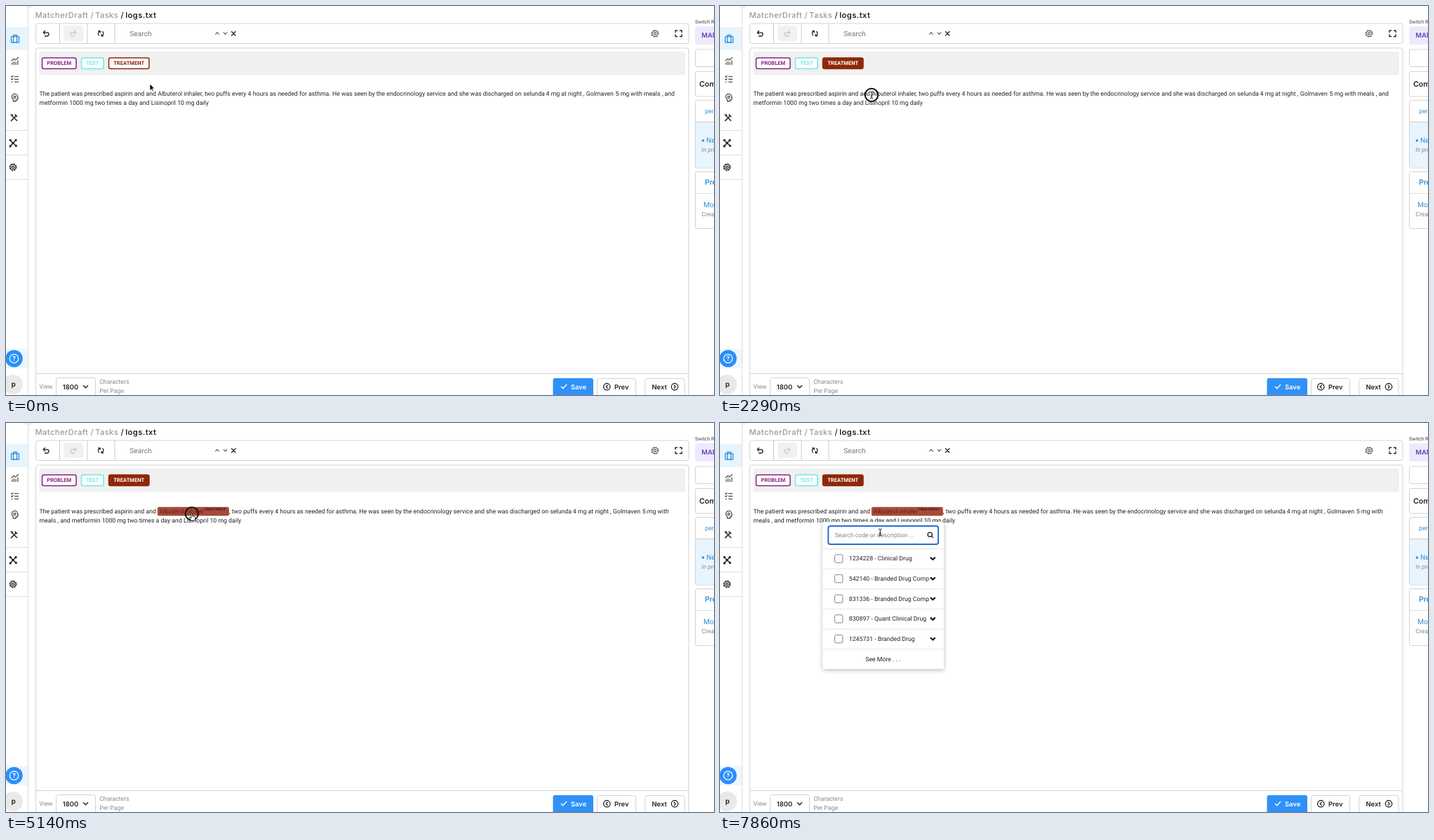
An HTML page that plays this animation: 1009 by 555 pixels, repeating every 8000 ms.

```html
<!DOCTYPE html>
<html lang="en">
<head>
<meta charset="utf-8">
<title>Annotation editor</title>
<style>
html, body { margin: 0; width: 100%; height: 100%; overflow: hidden; background: #fff; }
svg { display: block; width: 1009px; height: 555px; text-rendering: geometricPrecision; }
text { font: 8.72px Roboto, sans-serif; fill: #222; }
.head, .head text { font: 500 11.2px Inter, sans-serif; letter-spacing: .4px; fill: #9a9a9a; }
.btn { font: 600 9.4px Inter, sans-serif; }
.tag { font: 700 7.6px Roboto, sans-serif; text-anchor: middle; }
.box { fill: #fff; stroke: #d3d3d3; }
.rule { stroke: #dedede; fill: none; }
.ico { fill: none; stroke: #333; stroke-width: 1.3; stroke-linecap: round; stroke-linejoin: round; }
.grey { fill: #888; }
.blue { fill: #2d8fd8; }
</style>
</head>
<body>
<svg viewBox="0 0 1009 555">
  <defs>
    <path id="down" d="M-2.3 -1.1 0 1.2 2.3 -1.1"/>
    <path id="undo" d="M-1.5 -4 -3.8 -1.7 -1.5 .6M-3.8 -1.7H1.4A2.6 2.6 0 0 1 1.4 3.5H-1.5"/>
    <g id="gear">
      <circle r="4.1"/><circle r="1.7"/>
      <circle r="4.9" stroke-dasharray="1.9 1.95" stroke-width="1.1" stroke-linecap="butt"/>
    </g>
    <clipPath id="selClip"><rect id="selArea" x="216" y="119" width="0" height="13"/></clipPath>
    <clipPath id="rowClip"><rect x="147" y="180" width="151.5" height="170"/></clipPath>
    <filter id="shadow" x="-20%" y="-20%" width="140%" height="140%">
      <feDropShadow dx="0" dy="1.5" stdDeviation="3" flood-opacity=".28"/>
    </filter>
  </defs>

  <!-- sidebar -->
  <rect y="30" width="31" height="33" fill="#e6f4fd"/>
  <rect y="489" width="31" height="28" fill="#eef6ff"/>
  <path class="rule" d="M31.5 0V555M0 177.5H31M0 212.5H31M0 247.5H31"/>
  <circle class="rule" cx="33" cy="-3.5" r="5.5"/>
  <g class="ico" style="stroke:#2d8fd8">
    <rect x="7.5" y="43.5" width="11" height="8.5" rx="1"/>
    <path d="M10.5 43.5V52M15.5 43.5V52M10.8 43V41.3H15.2V43"/>
  </g>
  <g class="ico" style="stroke:#555">
    <path d="M8 78 11 75.3 13.4 77 17.5 73.5M8.8 83.5V81M11.4 83.5V79.5M14 83.5V80.5M16.8 83.5V78"/>
    <path d="M7.5 100.5 8.5 101.5 10 99.8M12.5 100.7H17.5M7.5 104.3 8.5 105.3 10 103.6M12.5 104.5H17.5M8 108.3H9M12.5 108.3H17.5"/>
    <path d="M10.3 136V133.2A4.2 4.2 0 1 1 16.7 129.7L17.3 131.8H16.3V134H14.2V136Z"/>
    <circle cx="12.5" cy="130" r="1.5"/>
  </g>
  <g class="ico" style="stroke:#333;stroke-width:1.7">
    <path d="M8 156 15.5 163.5M7.5 163.7 14.3 156.8M13 155.2 15.5 157.7M7.2 155.3H9.2V157.3"/>
  </g>
  <g class="ico" style="stroke:#222">
    <path d="M10 195.5 6.7 192M10 195.5 13.6 192M10 195.5 6.7 199.5M10 195.5 13.8 199"/>
    <circle cx="6.2" cy="191.4" r="1"/><circle cx="14" cy="191.5" r="1"/>
    <circle cx="6.2" cy="200" r="1"/><circle cx="14.3" cy="199.4" r="1"/>
    <circle cx="10" cy="195.5" r="1.2"/>
    <use href="#gear" x="10" y="230"/>
  </g>
  <circle cx="11.5" cy="503" r="12.3" fill="#2b8ffa"/>
  <circle class="ico" cx="11.5" cy="503" r="6.2" style="stroke:#fff"/>
  <text x="11.5" y="506.3" text-anchor="middle" style="font-size:9px;font-weight:700;fill:#fff">?</text>
  <circle cx="10" cy="540" r="14" fill="#e9e9e9"/>
  <text class="btn" x="10.7" y="542.5" text-anchor="middle" style="font-size:10px">p</text>

  <!-- breadcrumb -->
  <g class="head">
    <text x="41.5" y="17">MatcherDraft</text><text x="120.5" y="17">/</text>
    <text x="127" y="17">Tasks</text><text x="163.5" y="17" style="fill:#222">/</text>
    <text x="170.3" y="17" style="fill:#222;font-weight:600">logs.txt</text>
  </g>

  <!-- toolbar -->
  <rect class="box" x="42.5" y="25" width="930.5" height="28.5" rx="3"/>
  <path class="rule" d="M76.5 25V53M116 25V53M155 25V53" style="stroke:#ccc"/>
  <rect x="82" y="28" width="28" height="22" rx="4" fill="#f1f1f1"/>
  <g class="ico" style="stroke:#222">
    <use href="#undo" x="57" y="39.5"/>
    <use href="#undo" transform="translate(96 39.5) scale(-1 1)" stroke="#c8c8c8" style="stroke:#c8c8c8"/>
    <path d="M132.5 42A3.6 3.6 0 0 1 134 35.9M131.8 35.6H134.2V38M137.7 36.4A3.6 3.6 0 0 1 136.3 42.5M138.5 42.8H136.1V40.4"/>
    <use href="#down" transform="translate(301 39) scale(1 -1)" style="stroke:#666"/>
    <use href="#down" x="312.5" y="39" style="stroke:#666"/>
    <path d="M321.5 36.5 327 42M327 36.5 321.5 42"/>
  </g>
  <g class="ico" style="stroke:#555;stroke-width:1.1">
    <use href="#gear" x="925" y="39.3"/>
    <path d="M956.5 35H954V37.5M960.5 35H963V37.5M956.5 43.5H954V41M960.5 43.5H963V41" style="stroke:#222;stroke-width:1.4"/>
  </g>
  <text x="176.3" y="42.8" style="font-size:10.2px;fill:#777">Search</text>

  <!-- editor -->
  <rect class="box" x="42.5" y="60" width="930.5" height="510" rx="3"/>
  <rect x="47.5" y="65" width="920.5" height="33.5" rx="3" fill="#f0f0f0"/>
  <g stroke-width="1.5">
    <rect x="51.5" y="74" width="48.5" height="15.5" rx="2.5" fill="#fff" stroke="#862481"/>
    <rect x="107.5" y="74" width="31.5" height="15.5" rx="2.5" fill="#fff" stroke="#6fe9e3"/>
    <rect id="treat" x="146.5" y="74" width="57.5" height="15.5" rx="2.5" stroke="#8a2a0c"/>
  </g>
  <text class="tag" x="75.8" y="84.4" style="fill:#862481">PROBLEM</text>
  <text class="tag" x="123.3" y="84.4" style="fill:#6fe9e3">TEST</text>
  <text class="tag" id="treatText" x="175.2" y="84.4">TREATMENT</text>

  <g id="plain">
    <g id="plainText"></g>
    <g id="selection">
      <rect id="selBox" x="216" y="119" width="0" height="12.5" fill="#2f80d8"/>
      <text x="216.3" y="128" clip-path="url(#selClip)" style="fill:#fff">Albuterol inhaler,</text>
    </g>
  </g>
  <g id="marked">
    <rect x="216.3" y="120.3" width="101" height="11.6" rx="1.5" fill="#a94b3a" stroke="#96361f" stroke-width=".8"/>
    <text x="218.7" y="129.2" style="fill:#5f2117">Albuterol inhaler</text>
    <text x="282" y="125.4" style="font:5.75px 'Liberation Mono',monospace;fill:#1c0c08">TREATMENT</text>
    <g id="markedText"></g>
  </g>

  <!-- footer -->
  <path class="rule" d="M42 524.5H973" style="stroke:#d3d3d3"/>
  <text class="grey" x="47.5" y="546">View</text>
  <rect class="box" x="71.5" y="530.5" width="56" height="30" rx="3"/>
  <text class="btn" x="80.8" y="546.5">1800</text>
  <use class="ico" href="#down" transform="translate(113.5 543.2) scale(1.3)"/>
  <text class="grey" x="133.2" y="539.3">Characters</text>
  <text class="grey" x="133.2" y="552">Per Page</text>
  <rect x="779.5" y="531" width="57.5" height="30" rx="3" fill="#2f91f8"/>
  <path class="ico" d="M791.3 543.3 793.8 545.8 798.8 540.3" style="stroke:#fff"/>
  <text class="btn" x="805" y="546.5" style="fill:#fff">Save</text>
  <rect class="box" x="842.5" y="531.5" width="55" height="30" rx="3"/>
  <rect class="box" x="911" y="531.5" width="56" height="30" rx="3"/>
  <g class="ico" style="stroke:#222">
    <circle cx="856.3" cy="543.2" r="4.7"/><path d="M857.2 541.2 855.2 543.2 857.2 545.2"/>
    <circle cx="953" cy="543.2" r="4.7"/><path d="M952.2 541.2 954.2 543.2 952.2 545.2"/>
  </g>
  <text class="btn" x="867" y="546.5">Prev</text>
  <text class="btn" x="920.5" y="546.5">Next</text>

  <!-- right panel -->
  <text x="982" y="25.2" style="font-size:7.1px;fill:#444">Switch Role</text>
  <rect x="982" y="29" width="60" height="26" rx="3" fill="#efe9fd"/>
  <text class="btn" x="991.3" y="45.3" style="fill:#5a3fc4">MANUAL</text>
  <rect class="box" x="982.5" y="62" width="60" height="24.5" rx="2"/>
  <rect class="box" x="982.5" y="93.5" width="60" height="35.5" rx="2"/>
  <text class="btn" x="988" y="114.7" style="font-size:10.6px">Completions</text>
  <rect class="box" x="982.5" y="134.5" width="60" height="96.5" rx="2"/>
  <rect x="983" y="166" width="60" height="64.5" fill="#e8f5fe"/>
  <path class="rule" d="M983 165.5H1009" style="stroke:#ccc"/>
  <text class="blue" x="996" y="153">per</text>
  <circle class="blue" cx="993.3" cy="192" r="1.8"/>
  <text class="blue" x="998" y="194.7" style="font-size:10px">New</text>
  <text class="grey" x="991.3" y="208" style="font-style:italic;font-size:8.5px">In progress</text>
  <rect class="box" x="982.5" y="236.5" width="60" height="81" rx="2"/>
  <path class="rule" d="M983 267.5H1009"/>
  <text class="blue btn" x="996" y="255" style="font-size:10.4px;fill:#2d8fd8">Predictions</text>
  <text class="blue" x="994" y="286.7" style="font-size:10.3px">Model</text>
  <text class="grey" x="991.3" y="300">Created</text>

  <!-- code lookup -->
  <g id="popup">
    <rect x="146.5" y="141" width="172.5" height="210" rx="3" fill="#fff" filter="url(#shadow)"/>
    <rect id="field" x="154.3" y="147" width="156.8" height="26" rx="3" fill="#fff"/>
    <text x="163.7" y="163.2" style="fill:#858585">Search code or description ...</text>
    <path id="caret" d="M164.5 154.5V165.5" stroke="#222" stroke-width=".9"/>
    <g class="ico" style="stroke:#222"><circle cx="299.2" cy="159.2" r="3.1"/><path d="M301.5 161.5 303.6 163.6"/></g>
    <g id="rows"></g>
    <text x="232.3" y="339.8" text-anchor="middle">See More . . .</text>
  </g>

  <!-- pointer -->
  <g id="pointer">
    <circle id="ring" r="9.2" fill="none" stroke="#111" stroke-width="2"/>
    <path id="arrow" d="M0 0V9.4L2.1 7.5 3.5 10.6 5 9.9 3.6 6.9H6.5Z" fill="#000" stroke="#fff" stroke-width=".7"/>
    <path id="beam" d="M-2.2 -4.8Q0 -4.8 0 -3.5Q0 -4.8 2.2 -4.8M0 -3.5V3.5M-2.2 4.8Q0 4.8 0 3.5Q0 4.8 2.2 4.8M-1.2 1.4H1.2" fill="none" stroke="#111"/>
    <path id="hand" d="M-1 .2Q0 -.9 .9 .2V3.4L4.2 4.2Q5.2 4.6 5 6L4.4 9.8H-.8L-3.6 6.4Q-3.6 5.2 -2.4 5.4L-1 6.4Z" fill="#fff" stroke="#111" stroke-width=".9" stroke-linejoin="round"/>
  </g>
</svg>
<script>
const $ = id => document.getElementById(id);
const show = (id, on) => { $(id).style.display = on ? "" : "none"; };
const write = (id, y, parts) => {
  $(id).innerHTML += parts.map(([x, s]) => `<text x="${x}" y="${y}">${s}</text>`).join("");
};

const start = "The patient was prescribed aspirin and and";
const puffs = "two puffs every 4 hours as needed for asthma.";
const visit = "He was seen by the endocrinology service and she was discharged on";
const rest = "metformin 1000 mg two times a day and Lisinopril 10 mg daily";

write("plainText", 128, [[47.5, start], [216.3, "Albuterol inhaler, " + puffs], [465, visit],
  [737.3, "selunda"], [769.6, "4 mg at night ,"], [826.8, "Golmaven"], [868.6, "5 mg with meals , and"]]);
write("plainText", 141, [[47.5, rest]]);
write("markedText", 129.2, [[47.5, start], [317.8, ", " + puffs], [503.3, visit],
  [775.5, "selunda"], [807.8, "4 mg at night ,"], [865, "Golmaven"], [906.8, "5 mg with"]]);
write("markedText", 142.3, [[47.5, "meals , and " + rest]]);

const codes = ["1234228 - Clinical Drug", "542140 - Branded Drug Comp", "831336 - Branded Drug Comp",
  "830897 - Quant Clinical Drug", "1245731 - Branded Drug"];
$("rows").innerHTML = codes.map((name, i) => {
  const y = 193.5 + i * 28.65;
  return `<path class="rule" d="M147 ${y - 14}H319" style="stroke:#e6e6e6"/>
    <rect x="163.5" y="${y - 5.7}" width="11.4" height="11.4" rx="2" fill="#fff" stroke="#858585"/>
    <text x="183.8" y="${y + 2.8}" clip-path="url(#rowClip)">${name}</text>
    <use class="ico" href="#down" transform="translate(303.3 ${y}) scale(1.2)" style="stroke:#111;stroke-width:1.8"/>`;
}).join("") + '<path class="rule" d="M147 322.7H319" style="stroke:#e6e6e6"/>';

// step, x, y, pointer shape
const path = [
  [0, 205, 111, "arrow"], [1, 198, 102, "arrow"], [2, 186, 88, "hand"], [3, 181, 83, "hand"],
  [5, 181, 83, "hand"], [6, 189, 93, "arrow"], [7, 204, 113, "arrow"], [8, 214, 125, "beam"],
  [10, 216, 127, "beam"], [16, 216, 127, "beam"], [20, 279, 129, "beam"], [21, 280, 129, "beam"],
  [23, 280, 130, "hand"], [24, 281, 143, "arrow"], [26, 279, 156, "arrow"], [31, 279, 157, "arrow"],
  [34, 265, 130, "hand"], [39, 264.5, 128.5, "hand"], [40, 269, 157, "beam"], [41, 269, 157, "beam"],
  [44, 228, 157, "beam"], [50, 228, 157, "beam"], [51, 228.3, 156, "beam"], [56, 228.3, 156, "beam"]
];
const loop = 8000, rate = 7 / 1000;
const within = (k, a, b) => k >= a && k <= b;

function pointerAt(k) {
  const i = path.findIndex(p => p[0] > k) - 1;
  const a = path[i], b = path[i + 1], f = (k - a[0]) / (b[0] - a[0]);
  return [a[1] + (b[1] - a[1]) * f, a[2] + (b[2] - a[2]) * f, a[3]];
}

let last = -1;
function draw(t) {
  const k = Math.min(55, Math.floor((t % loop + 5) * rate));
  if (k !== last) {
    last = k;
    const [x, y, shape] = pointerAt(k);
    $("pointer").setAttribute("transform", `translate(${x} ${y})`);
    for (const s of ["arrow", "beam", "hand"]) show(s, s === shape);
    show("ring", within(k, 4, 5) || within(k, 15, 21) || within(k, 35, 36) || within(k, 45, 48));

    const picked = k >= 4;
    $("treat").setAttribute("fill", picked ? "#8f2708" : "#fff");
    $("treatText").style.fill = picked ? "#fff" : "#8a2a0c";

    const wide = within(k, 16, 21) ? Math.max(0, x - 216) : 0;
    for (const id of ["selBox", "selArea"]) $(id).setAttribute("width", wide);
    show("plain", k < 22);
    show("marked", k >= 22);

    const focus = k >= 45;
    show("popup", k >= 37);
    $("field").setAttribute("stroke", focus ? "#2a6fd0" : "#bdbdbd");
    $("field").setAttribute("stroke-width", focus ? 2 : 1);
    show("caret", within(k, 45, 48) || within(k, 52, 54));
  }
}
const t0 = performance.now();
function tick() {
  draw(performance.now() - t0);
  requestAnimationFrame(tick);
}
tick();
</script>
</body>
</html>
```
